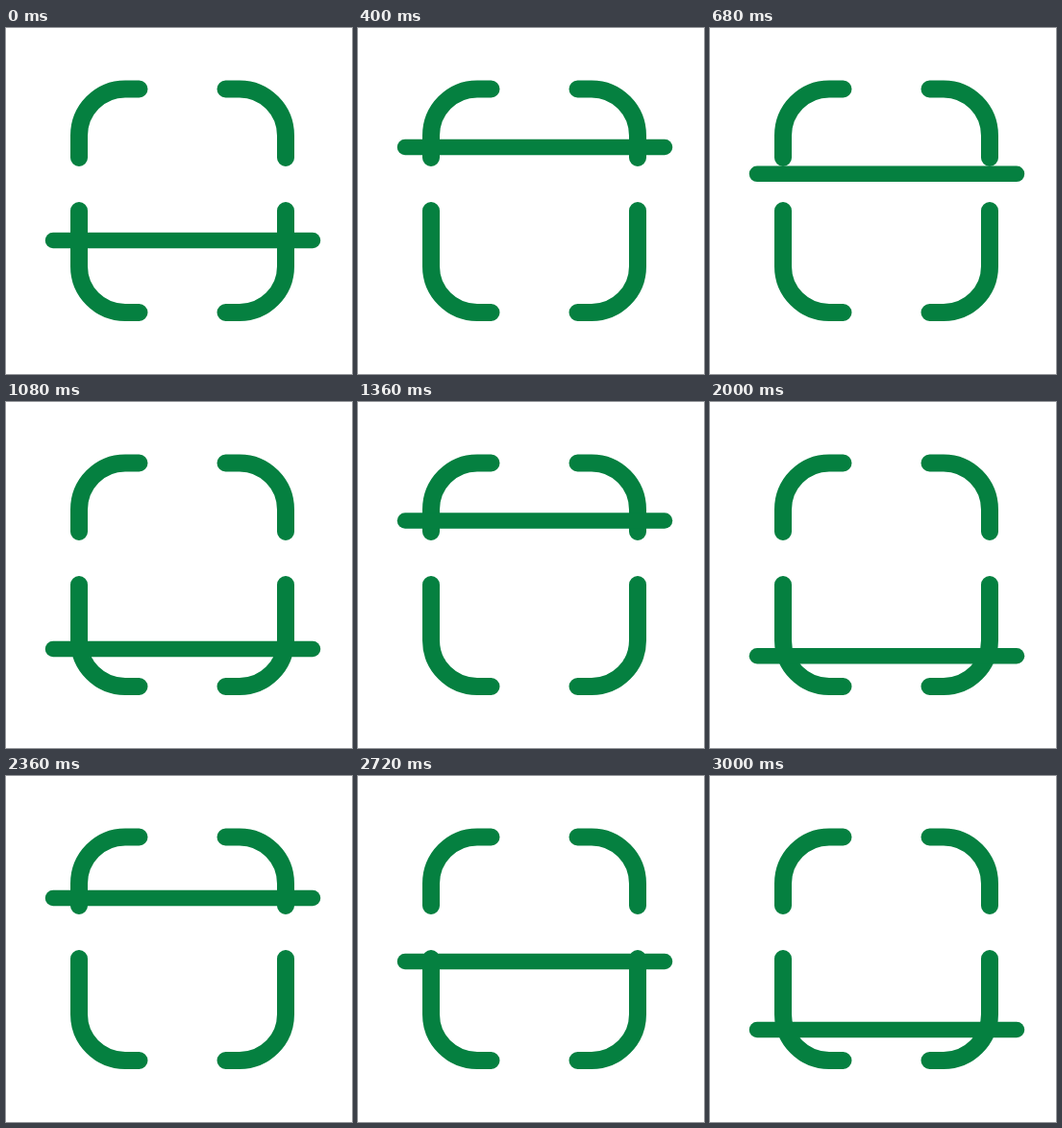
Animation of 360 by 360 pixels, one loop 3320 ms. Source, as an HTML page:

```html
<!DOCTYPE html>
<html lang="en">
<head>
<meta charset="utf-8">
<title>Scanner</title>
<style>
html, body { margin: 0; width: 100%; height: 100%; overflow: hidden; background: #fff; }
svg { display: block; width: 100vw; height: 100vh; }
</style>
</head>
<body>
<svg viewBox="0 0 360 360" fill="none" stroke="#058040" stroke-width="18" stroke-linecap="round">
  <defs>
    <path id="side" d="M76 135V112A48 48.5 0 0 1 124 63.5H138.5M76 190V248A48 48 0 0 0 124 296H138.5"/>
  </defs>
  <use href="#side"/>
  <use href="#side" transform="matrix(-1 0 0 1 367 0)"/>
  <path id="bar" d="M49 0H319" stroke-width="16.5"/>
</svg>
<script>
const LOOP = 3320, STEP = 40, LAST = 3000;

// Heights of the bar on its slow way down and quick way up: [ms, y]
const keys = [
  [0, 221], [160, 268], [400, 124], [430, 121], [1080, 257], [1120, 268],
  [1380, 121], [1640, 172], [2060, 268], [2325, 121], [2360, 127],
  [2720, 193], [3000, 264]
];

const slope = i => (keys[i + 1][1] - keys[i][1]) / (keys[i + 1][0] - keys[i][0]);

// Flat at turning points, harmonic mean of the neighbouring slopes elsewhere
const tangents = keys.map((_, i) => {
  if (i === 0) return slope(0);
  if (i === keys.length - 1) return slope(i - 1);
  const a = slope(i - 1), b = slope(i);
  return a * b > 0 ? 2 * a * b / (a + b) : 0;
});

function barY(t) {
  let i = 0;
  while (i < keys.length - 2 && t >= keys[i + 1][0]) i++;
  const [t0, y0] = keys[i], [t1, y1] = keys[i + 1];
  const h = t1 - t0, u = (t - t0) / h, v = 1 - u;
  return y0 * v * v * (1 + 2 * u) + y1 * u * u * (3 - 2 * u)
    + h * u * v * (tangents[i] * v - tangents[i + 1] * u);
}

const bar = document.getElementById("bar");

function draw() {
  const t = performance.now() % LOOP;
  const y = barY(Math.min(Math.floor(t / STEP) * STEP, LAST));
  bar.setAttribute("transform", `translate(0 ${y.toFixed(2)})`);
  requestAnimationFrame(draw);
}
draw();
</script>
</body>
</html>
```
